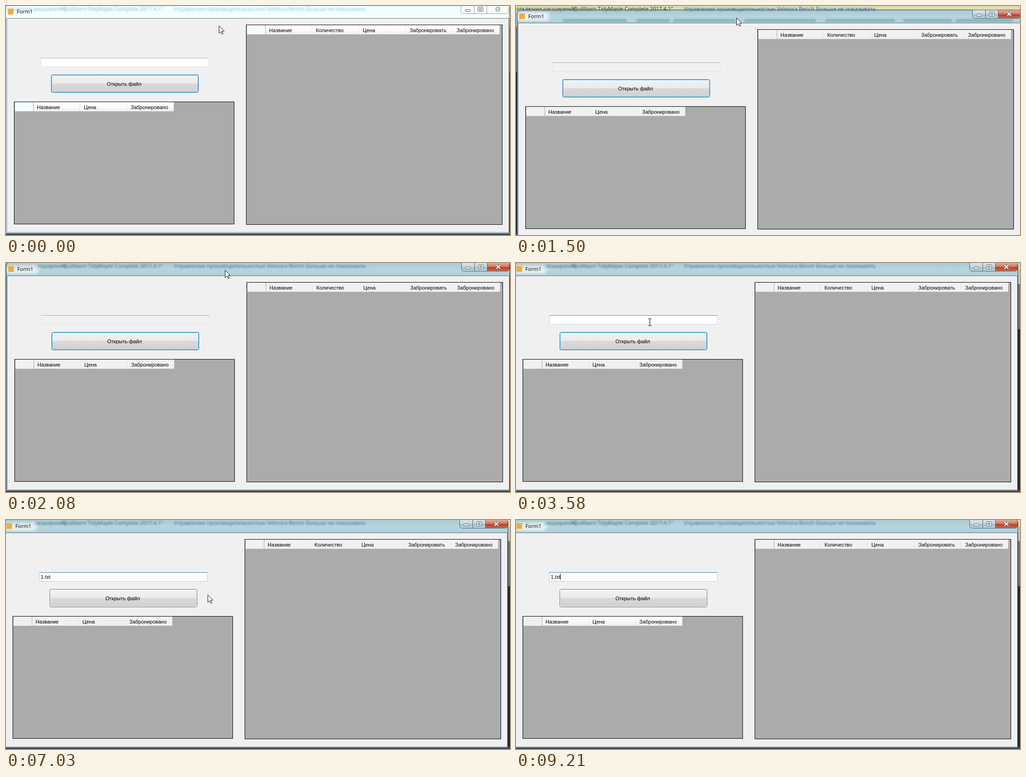
Animation, 1075 px wide and 491 px high, one loop 9370 ms. Source, as an HTML page with a canvas:

```html
<!DOCTYPE html>
<html lang="ru">
<head>
<meta charset="utf-8">
<title>Form1</title>
<style>
html, body { margin: 0; width: 100%; height: 100%; overflow: hidden; background: #f0f0f0; }
canvas { display: block; width: 1075px; height: 491px; }
</style>
</head>
<body>
<canvas id="stage" width="1075" height="491"></canvas>
<script>
const ctx = document.getElementById('stage').getContext('2d');
const W = 1075, H = 491, LOOP = 9370;
const UI = '11px "Liberation Sans", Arial, sans-serif';
const CAPTION = '11.3px "Open Sans", "Noto Sans", sans-serif';

// The picture advances in bursts: [first, last, steps]
const bursts = [[230, 650, 4], [1080, 1500, 4], [1650, 1800, 2], [1920, 2080, 2],
  [2220, 3190, 7], [3460, 3580, 2], [3730, 3730, 1], [4130, 4130, 1], [4650, 4650, 1],
  [5240, 5360, 2], [5790, 6090, 3], [6650, 7030, 4], [7150, 7570, 4], [7720, 8660, 8],
  [8810, 8940, 2], [9210, 9210, 1]];
const ticks = [0];
for (const [a, b, n] of bursts)
  for (let i = 0; i < n; i++) ticks.push(n > 1 ? a + (b - a) * i / (n - 1) : a);

// Waypoints: [time, x, y]
const windowPath = [[940, 0, 0], [1500, 3, 10], [1800, 6, 10], [2080, 1, 1], [2540, -3, 1]];
const pointerPath = [[90, 454, 42], [650, 467, 23], [1080, 467, 23], [1500, 470, 25],
  [1800, 473, 23], [2080, 467, 15], [2540, 463, 14], [3190, 290, 125], [3460, 286, 127],
  [6650, 286, 127], [6890, 372, 127], [7030, 430, 160], [7290, 440, 174], [7570, 443, 177],
  [8660, 947, 447], [8810, 974, 474]];
const caretOn = [[3730, 4130], [4650, 5240], [5360, 6650], [7150, 7720], [8190, 8660], [9210, LOOP]];
const typed = [[0, ''], [5360, '1'], [5790, '1.'], [5940, '1.t'], [6090, '1.txt']];

const within = (v, a, b) => v >= a && v < b;

function along(path, t) {
  let i = path.findIndex(p => p[0] > t);
  if (i < 0) i = path.length;
  const a = path[Math.max(i - 1, 0)], b = path[Math.min(i, path.length - 1)];
  const k = a === b ? 0 : (t - a[0]) / (b[0] - a[0]);
  return [1, 2].map(c => Math.round(a[c] + (b[c] - a[c]) * k));
}

function rect(x, y, w, h, fill) {
  ctx.fillStyle = fill;
  ctx.fillRect(x, y, w, h);
}

function frame(x, y, w, h, color) {
  ctx.strokeStyle = color;
  ctx.strokeRect(x + .5, y + .5, w - 1, h - 1);
}

function shade(y, h, ...stops) {
  const g = ctx.createLinearGradient(0, y, 0, y + h);
  stops.forEach(([p, c]) => g.addColorStop(p, c));
  return g;
}

function rounded(x, y, w, h, r, fill, stroke) {
  ctx.beginPath();
  ctx.roundRect(x, y, w, h, r);
  if (fill) { ctx.fillStyle = fill; ctx.fill(); }
  if (stroke) { ctx.strokeStyle = stroke; ctx.stroke(); }
}

function label(s, x, y, color = '#000', font = UI, align = 'left') {
  ctx.font = font;
  ctx.textAlign = align;
  ctx.fillStyle = color;
  ctx.fillText(s, x, y);
}

function barText(dark, link) {
  label('отключил расширение', 128, 10, dark, CAPTION, 'right');
  label('"Quillbarn TidyMaple Complete 2017.4.1"', 335, 10, dark, CAPTION, 'right');
  label('Управление производительностью Velmora Bench', 358, 10, link, CAPTION);
  label('Больше не показывать', 640, 10, link, CAPTION);
}

// Soft focus: several faint shifted copies
function soft(alpha, paint) {
  ctx.save();
  ctx.globalAlpha = alpha / 15;
  for (let i = 0; i < 15; i++) {
    ctx.save();
    ctx.translate(i % 5 - 2, Math.floor(i / 5) * 1.5 - 1.5);
    paint();
    ctx.restore();
  }
  ctx.restore();
}

function backdrop() {
  rect(0, 0, W, H, '#1f2633');
  rect(0, 0, W, 14, '#dfdcae');
  rect(0, 14, W, 31, '#b4c8d2');
  rect(0, 45, W, 97, '#6c7680');
  rect(0, 486, W, 5, '#3c4450');
  barText('#222', '#0a5cb4');
}

function glass(dx, dy, active) {
  const x = dx - 1, y = dy - 2, w = 1075, h = 490;
  ctx.save();
  rounded(x, y, w, h, [6, 6, 0, 0], active
    ? shade(y, 29, [0, '#a9c9d3'], [.5, '#b6d5dd'], [1, '#b0ced8'])
    : shade(y, 29, [0, '#effcfd'], [1, '#f6ffff']));
  ctx.clip();
  if (active) {
    soft(.8, () => barText('#32505f', '#1e5fa0'));
    soft(.5, () => {
      for (const [a, b] of [[100, 236], [257, 328], [336, 468], [487, 640], [660, 808], [826, 930], [938, 1060]])
        rounded(a, 28, b - a, 6, 3, '#5f8294');
    });
    for (let i = 0; i < 6; i++)
      rounded(dx - 4 + i * 2, dy + 1 + i, 76 - i * 4, 23 - i * 2, 10 - i, 'rgba(255,255,255,.16)');
  } else {
    soft(.75, () => barText('#5aafc3', '#50cdeb'));
  }
  ctx.restore();
  rounded(x + .5, y + .5, w - 1, h - 1, [6, 6, 0, 0], null, active ? '#2f3b42' : '#6f7d84');
}

function captionButtons(active) {
  const line = active ? '#50646e' : '#8d989e';
  const fill = active
    ? shade(-1, 17, [0, '#d6e4ea'], [.5, '#c3d6de'], [.52, '#a5bdc9'], [1, '#bdd3dc'])
    : '#f8fdfd';
  const red = active
    ? shade(-1, 17, [0, '#e6aa9b'], [.5, '#d2705d'], [.52, '#b93823'], [1, '#cf6a4e'])
    : fill;
  rounded(970.5, -1.5, 28, 18, [0, 0, 0, 5], fill, line);
  rounded(998.5, -1.5, 27, 18, 0, fill, line);
  rounded(1025.5, -1.5, 47, 18, [0, 0, 5, 0], red, line);
  const ink = '#4d565d';
  rounded(979.5, 7.5, 11, 4, 1, '#fff', ink);
  rounded(1006.5, 2.5, 11, 9, 1, '#fff', ink);
  rounded(1009.5, 5.5, 5, 3, 0, fill, ink);
  const cross = (width, color) => {
    ctx.lineWidth = width;
    ctx.strokeStyle = color;
    ctx.beginPath();
    ctx.moveTo(1045, 3); ctx.lineTo(1053, 11);
    ctx.moveTo(1053, 3); ctx.lineTo(1045, 11);
    ctx.stroke();
  };
  cross(4.5, ink);
  cross(2.4, '#fff');
  ctx.lineWidth = 1;
}

function grid(x, y, w, h, names, bright) {
  rect(x, y, w, h, '#ababab');
  frame(x, y, w, h, '#000');
  const left = x + 41, top = y + 1;
  rect(x + 2, top, 39, 20, bright === 2 ? '#f3fefe' : '#f1f1f1');
  rect(left, top, names.length * 100, 20,
    bright ? shade(top, 20, [0, '#fff'], [.4, '#fdfdfd'], [1, '#efeff0']) : '#f1f1f1');
  rect(x + 2, top + 19, names.length * 100 + 39, 1, '#dcdddf');
  rect(left, top, 1, 20, '#a9abad');
  names.forEach((name, i) => {
    rect(left + 100 * (i + 1) - 1, top + 4, 1, 15, '#e2e3e5');
    label(name, left + 100 * i + 8, y + 16);
  });
}

function button(focused) {
  const x = 96, y = 147, w = 315, h = 39;
  rounded(x + .5, y + .5, w - 1, h - 1, 3,
    shade(y, h, [0, '#f3f3f3'], [.48, '#ebebeb'], [.5, '#dadada'], [1, '#cfcfcf']),
    focused ? '#3c7fb1' : '#707070');
  rounded(x + 1.5, y + 1.5, w - 3, h - 3, 2, null, focused ? '#48c4ea' : '#f6f6f6');
  label('Открыть файл', x + 156, y + 24, '#000', UI, 'center');
}

function textBox(t, hover, focused) {
  const x = 74, y = 111, w = 359, h = 20;
  rect(x, y, w, h, within(t, 1080, 3190) ? '#f1f1f1' : '#fff');
  frame(x, y, w, h, focused ? '#b5cfe7' : hover ? '#c5daed' : '#e0e3e7');
  rect(x, y, w, 1, focused ? '#3d7bad' : hover ? '#5794bf' : '#abadb3');
  const value = typed.filter(s => s[0] <= t).pop()[1];
  label(value, x + 3, y + 14);
  if (caretOn.some(([a, b]) => within(t, a, b)))
    rect(Math.floor(x + 3 + ctx.measureText(value).width), y + 3, 1, 13, '#000');
}

function arrow(x, y) {
  ctx.beginPath();
  [[.5, .5], [.5, 16.5], [4.3, 13], [6.8, 18.6], [9, 17.6], [6.6, 12], [11.5, 12]]
    .forEach(([a, b]) => ctx.lineTo(x + a, y + b));
  ctx.closePath();
  ctx.fillStyle = '#fff';
  ctx.fill();
  ctx.strokeStyle = '#111';
  ctx.stroke();
}

function beam(x, y) {
  rect(x - 1, y - 7, 1, 14, '#000');
  for (const end of [y - 8, y + 7]) {
    rect(x - 4, end, 3, 1, '#000');
    rect(x, end, 3, 1, '#000');
  }
}

function draw(t) {
  const [dx, dy] = along(windowPath, t);
  const [px, py] = along(pointerPath, t);
  const active = t >= 1080, editing = t >= 3730;
  const hover = t > 2540 && within(px - dx, 74, 433) && within(py - dy, 111, 131);

  backdrop();
  glass(dx, dy, active);
  ctx.save();
  ctx.translate(dx, dy);
  captionButtons(active);
  rect(4, 6, 12, 12, '#efae35');
  label('Form1', 23, 16, '#000', CAPTION);
  rect(2, 27, 1070, 458, '#f0f0f0');
  frame(1, 26, 1072, 460, '#66747c');
  textBox(t, hover, editing);
  button(!editing);
  grid(17, 205, 470, 263, ['Название', 'Цена', 'Забронировано'], active ? +(t >= 8190) : 2);
  grid(512, 40, 547, 429, ['Название', 'Количество', 'Цена', 'Забронировать', 'Забронировано'], active ? 0 : 2);
  ctx.restore();

  if (!within(t, 5360, 6650) && t < 8940) (hover ? beam : arrow)(px, py);
}

let shown = -1;
function loop() {
  const time = performance.now() % LOOP;
  const tick = ticks.filter(v => v <= time + .01).pop();
  if (tick !== shown) draw(shown = tick);
  requestAnimationFrame(loop);
}
loop();
</script>
</body>
</html>
```
